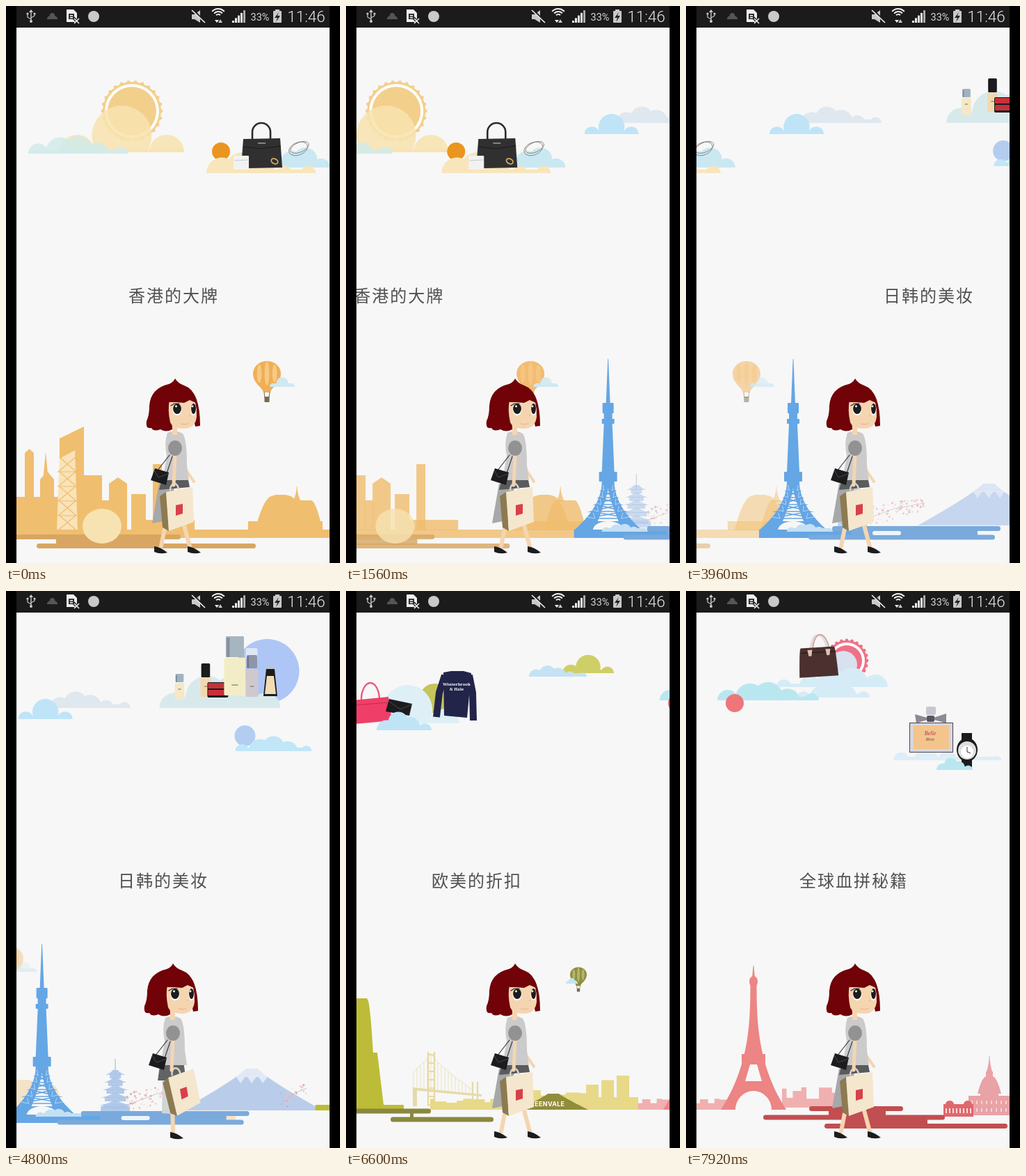
Animation, 480 px wide and 800 px high, one loop 8 s. Source, as an HTML page with a canvas:

```html
<!DOCTYPE html>
<html lang="zh">
<head>
<meta charset="utf-8">
<title>Shopping walk</title>
<style>
html, body { margin: 0; width: 100%; height: 100%; overflow: hidden; background: #000; }
canvas { display: block; width: 480px; height: 800px; }
</style>
</head>
<body>
<canvas id="stage" width="480" height="800"></canvas>
<script>
const ctx = document.getElementById('stage').getContext('2d');
const LOOP = 8000, STEP = 120, BG = '#f7f7f7', SKIN = '#f5d5b0', INK = '#1c1c1f';
const CJK = '"Noto Sans CJK SC", "Noto Sans CJK", sans-serif';
const titles = ['香港的大牌', '日韩的美妆', '欧美的折扣', '全球血拼秘籍'];

// scroll distance over time: [ms, px], joined by a monotone cubic
const keys = [[0, 0], [720, 88], [2520, 252], [3960, 432], [5640, 720], [6600, 1133], [7920, 1620]];
const slopes = keys.slice(1).map((k, i) => (k[1] - keys[i][1]) / (k[0] - keys[i][0]));
const tangents = keys.map((_, i) => {
  const a = slopes[i - 1] ?? slopes[i], b = slopes[i] ?? a;
  return 2 * a * b / (a + b);
});
function scrollAt(t) {
  const i = Math.max(0, keys.findIndex(k => k[0] >= t) - 1);
  const [t0, v0] = keys[i], [t1, v1] = keys[i + 1], d = t1 - t0;
  const u = (t - t0) / d, w = 1 - u;
  return v0 * (1 + 2 * u) * w * w + v1 * u * u * (3 - 2 * u)
    + d * u * w * (tangents[i] * w - tangents[i + 1] * u);
}
let scroll = 0;

// basic shapes
function trace(p) {
  ctx.beginPath();
  for (let i = 0; i < p.length; i += 2) ctx.lineTo(p[i], p[i + 1]);
}
function fill(color) { ctx.fillStyle = color; ctx.fill(); }
function stroke(color, width) { ctx.strokeStyle = color; ctx.lineWidth = width; ctx.stroke(); }
function poly(color, ...p) { trace(p); fill(color); }
function line(color, width, ...p) { trace(p); stroke(color, width); }
function box(color, x, y, w, h, r = 0) { ctx.beginPath(); ctx.roundRect(x, y, w, h, r); fill(color); }
function oval(color, x, y, rx, ry = rx) { ctx.beginPath(); ctx.ellipse(x, y, rx, ry, 0, 0, 7); fill(color); }
function ring(color, width, x, y, rx, ry = rx, turn = 0) {
  ctx.beginPath(); ctx.ellipse(x, y, rx, ry, turn, 0, 7); stroke(color, width);
}
function arch(color, width, x, y, rx, ry) {
  ctx.beginPath(); ctx.ellipse(x, y, rx, ry, 0, Math.PI, 0); stroke(color, width);
}
function path(color, d) { ctx.fillStyle = color; ctx.fill(new Path2D(d)); }
function curve(color, width, d) {
  ctx.strokeStyle = color; ctx.lineWidth = width; ctx.stroke(new Path2D(d));
}
function label(text, x, y, font, color, spacing = 0) {
  ctx.font = font; ctx.fillStyle = color; ctx.textAlign = 'center';
  ctx.letterSpacing = spacing + 'px';
  ctx.fillText(text, x + spacing / 2, y);
}
function random(seed) {
  return () => (seed = (seed * 16807) % 2147483647) / 2147483647;
}

// symmetric body whose half width runs from w0 to w1
function taper(color, cx, y0, y1, w0, w1, power = 1) {
  const left = [], right = [];
  for (let i = 0; i <= 24; i++) {
    const u = i / 24, y = y0 + (y1 - y0) * u, w = w0 + (w1 - w0) * u ** power;
    right.push(cx + w, y);
    left.unshift(cx - w, y);
  }
  poly(color, ...right, ...left);
}
function deck(color, cx, y, w, h) { box(color, cx - w, y, 2 * w, h, 1); }
// row of round bumps under an envelope, highest at the share `peak`
function cloud(color, x, w, base, height, peak = .4) {
  const n = Math.min(5, Math.max(3, Math.round(w / height * 1.3))), r = w / n * .72;
  ctx.save();
  ctx.beginPath(); ctx.rect(x, 0, w, base); ctx.clip();
  box(color, x, base - 5, w, 10, 5);
  for (let i = 0; i < n; i++) {
    const u = i / (n - 1), h = height * Math.max(.34, 1 - 1.25 * Math.abs(u - peak));
    const size = Math.min(r, h), cx = x + size + (w - 2 * size) * u;
    oval(color, cx, base - h + size, size);
  }
  ctx.restore();
}
function skyline(color, x, x2, base, low, high, seed) {
  const rnd = random(seed);
  while (x < x2) {
    const w = Math.min(x2 - x, 6 + rnd() * 14), h = low + rnd() * (high - low);
    box(color, x, base - h, w + .5, h);
    x += w;
  }
}
// block with a pointed roof
function house(color, x, w, top, roof, base = 753) {
  poly(color, x, base, x, top, x + w / 2, top - roof, x + w, top, x + w, base);
}
// stacked bars [x, x2], joined where neighbours overlap
function strips(color, y, gap, ...bars) {
  bars.forEach(([x, x2], i) => {
    box(color, x, y + i * gap, x2 - x, 7, 3.5);
    if (!i) return;
    const [px, px2] = bars[i - 1], from = Math.max(x, px) + 28;
    box(color, from, y + i * gap - 7, Math.max(0, Math.min(x2, px2) - 25 - from), 9);
  });
}
function gear(color, x, y, r, teeth) {
  for (let i = 0; i < teeth; i++) {
    const a = i * 2 * Math.PI / teeth;
    oval(color, x + Math.cos(a) * r, y + Math.sin(a) * r, 2.4);
  }
  ring(color, 4, x, y, r - 2);
  oval('#fff', x, y, r - 3);
  oval(color, x, y, r - 7);
}
function balloon(x, y, r, main, light) {
  ctx.save();
  ctx.translate(x, y); ctx.scale(r, r);
  path(main, 'M-1 0A1 .9 0 0 1 1 0C1 .7 .3 1 .25 1.35H-.25C-.3 1 -1 .7 -1 0Z');
  for (const i of [-1, 0, 1]) oval(light, i * .55, 0, .17, .85 - .2 * i * i);
  line('#7a6a52', .05, -.2, 1.3, -.16, 1.7, .16, 1.7, .2, 1.3);
  box('#7a6a52', -.18, 1.65, .36, .4, .06);
  ctx.restore();
}
function layer(ref, speed, draw, alpha = 1) {
  ctx.save();
  ctx.globalAlpha = alpha;
  ctx.translate((ref - scroll) * speed, 0);
  draw();
  ctx.restore();
}

// first city
function sunScene() {
  gear('#f3cf8c', 181, 151, 42, 26);
  ctx.globalAlpha = .85;
  cloud('#f8e3b0', 77, 179, 210, 67, .5);
  cloud('#d2ebe9', 32, 143, 212, 29, .4);
}
function bagScene() {
  cloud('#c9e8f2', 394, 72, 232, 38, .3);
  oval('#ea951f', 309, 209, 13);
  cloud('#f8e5bb', 288, 157, 240, 31, .22);
  arch('#2b2b2c', 2.6, 367, 181, 13, 13);
  line('#2b2b2c', 2.6, 354, 181, 354, 196); line('#2b2b2c', 2.6, 380, 181, 380, 196);
  poly('#303031', 341, 191, 394, 190, 397, 232, 349, 233, 338, 230);
  line('#19191a', 1, 341, 202, 366, 205, 395, 201);
  line('#bcbcbc', 1.2, 362, 197, 373, 197);
  box('#f2f2f0', 327, 215, 22, 20, 1);
  line('#c6c8cf', 1, 328, 222, 348, 221);
  for (const i of [0, 1]) ring('#8d827d', 1, 420 + 2 * i, 205 - 2 * i, 14, 9 - 2 * i, -.4);
  ring('#d8ad5a', 1.8, 386, 223, 5, 3.5, .5);
}
function goldCity() {
  const c = '#f0be6f';
  box(c, -40, 752, 740, 12);
  box(c, -40, 705, 117, 48);
  house(c, 27, 13, 642, 6); house(c, 49, 20, 680, 12); house(c, 54, 6, 672, 32);
  poly(c, 77, 753, 77, 621, 112, 604, 112, 753);
  box(c, 112, 674, 26, 79); house(c, 148, 26, 686, 9);
  box(c, 137, 710, 12, 43); box(c, 180, 701, 21, 52); box(c, 211, 658, 13, 95); box(c, 200, 738, 71, 15);
  poly('#f9e3b8', 77, 650, 99, 638, 103, 752, 73, 752);
  for (let y = 648; y < 745; y += 21) line(c, 1.2, 77, y, 101, y + 21, 75, y + 21, 100, y);
  taper(c, 395, 702, 753, 7, 37, .42);
  taper(c, 418, 690, 712, .4, 6, 2);
  taper(c, 425, 710, 753, 14, 30, .6);
  box(c, 348, 740, 107, 13);
  balloon(375, 528, 20, '#f0af55', '#f6c985');
  cloud('#cfe9f0', 379, 36, 547, 14, .5);
}

// second city
function blueTower() {
  const c = '#65a6e5', x = 154;
  taper(c, x, 507, 571, .4, 3);
  deck(c, x, 570, 8, 15); deck(c, x, 584, 6, 10); deck(c, x, 593, 9, 7);
  taper(c, x, 600, 670, 6, 9);
  deck(c, x, 669, 13, 14);
  taper(c, x, 683, 753, 9, 49, 2);
  taper(BG, x, 692, 740, 0, 15, 1.3);
  for (let y = 686; y < 736; y += 10) {
    const half = v => 8 + 40 * ((v - 683) / 69) ** 2, a = half(y), b = half(y + 10);
    line(c, 1.7, x - a, y, x + b, y + 10, x - b, y + 10, x + a, y);
    for (const s of [-1, 1]) line('#c7e0f5', .8, x + s * a * .9, y + 2, x + s * b * .6, y + 10, x + s * b * .95, y + 8);
  }
  oval(BG, x, 753, 22, 13);
  box(c, x - 49, 752, 150, 12);
  cloud('#c4e0f3', 145, 66, 755, 13);
  strips('#7aaadc', 747, 12.5, [210, 452], [176, 444]);
  box('#eef5fb', 268, 754, 41, 6, 3);
}
function blossoms(x, w, count, seed) {
  const rnd = random(seed);
  line('#c5abb0', .8, x, 738, x + w / 2, 722, x + w, 714);
  for (let i = 0; i < count; i++) {
    const u = rnd();
    oval(i % 3 ? '#eebfc4' : '#dba0a6', x + u * w, 735 - 20 * u + (rnd() - .5) * 32 * (1 - u / 2), .7 + rnd());
  }
}
function pagodaScene() {
  const c = '#a8c3e8', fuji = 243;
  taper('#b0c7ea', fuji, 686, 746, 8, 102, 1.15);
  taper('#e8edf7', fuji, 686, 698, 8, 24, 1.15);
  for (const i of [-1, 0, 1]) taper('#e8edf7', fuji + i * 16, 697, 707, 7, 0);
  line(c, 1.5, 47, 672, 47, 694);
  for (let i = 0; i < 5; i++) {
    const y = 688 + i * 11;
    taper(c, 47, y, y + 7, 4, 14 + i * 2.4, 1.6);
    deck(c, 47, y + 6, 8 + i * 2.4, 6);
  }
  deck(c, 47, 740, 21, 9);
  blossoms(64, 86, 90, 17);
  blossoms(284, 38, 25, 31);
}
function blueClouds() {
  cloud('#dfe8ee', 165, 116, 168, 25, .3);
  cloud('#bfe4f8', 120, 78, 184, 29, .5);
}
function bottle(x, w, top, cap, base, capColor, body) {
  box(capColor, x + w * .08, top, w * .84, cap, 1.5);
  box('#0003', x + w * .12, top + 2, w * .14, cap - 2);
  box(body, x, top + cap + 1, w, base - top - cap - 1, 2);
  line('#6c6757', 1, x + w * .35, base - 15, x + w * .65, base - 15);
}
function cosmetics() {
  oval('#aec6f6', 169, 115, 46);
  cloud('#d8e9ec', 14, 174, 168, 58, .5);
  bottle(36, 14, 119, 12, 156, '#9fb2c3', '#f4e8c8');
  bottle(73, 15, 104, 20, 152, INK, '#f2d9ad');
  box(INK, 83, 131, 30, 22, 2);
  for (const y of [132, 142]) box('#c73039', 84, y, 28, 8, 1);
  bottle(107, 31, 65, 30, 150, '#a7b5c1', '#f3edc7');
  box('#dfe6f4', 138, 82, 17, 16, 2);
  bottle(138, 18, 92, 19, 152, '#8e95aa', '#cfc8ce');
  box('#b9c6d0', 169, 107, 9, 6);
  taper(INK, 173.5, 112, 151, 6, 10);
  taper('#f1dcb3', 173.5, 122, 148, 5, 8);
}
function smallBlue() {
  oval('#b2cdf0', 192, 208, 15);
  cloud('#c0e6f8', 178, 110, 230, 23, .45);
}

// third city
function discounts() {
  cloud('#c6c55b', -17, 40, 188, 25, .5);
  oval('#c6c45a', 127, 154, 21);
  cloud('#def0f5', 14, 149, 190, 61, .42);
  arch('#e95b7c', 2.4, 35, 156, 13, 24);
  poly('#ef3f68', 10, 157, 61, 152, 66, 186, 12, 191);
  line('#c72a52', 1, 12, 164, 62, 160);
  poly(INK, 62, 155, 95, 162, 91, 179, 57, 173);
  line('#555', .8, 61, 158, 78, 170, 94, 163);
  cloud('#bfe4f6', 44, 79, 200, 29, .4);
  const navy = '#23244a';
  line(navy, 10, 142, 121, 134, 146, 130, 181);
  line(navy, 10, 177, 121, 182, 146, 183, 186);
  poly(navy, 140, 117, 151, 115, 169, 115, 180, 118, 174, 182, 141, 179);
  label('Winterbrook', 159, 136, 'bold 6px "Noto Serif", serif', '#fff');
  label('& Hale', 159, 143, 'bold 6px "Noto Serif", serif', '#fff');
  cloud('#cfcf68', 311, 74, 118, 28, .45);
  cloud('#c5e2f4', 263, 83, 123, 17, .3);
}
function oliveCity() {
  const c = '#e7d988', b = '#e5daa9', stone = '#bdbc38', mid = 23;
  // plain stepped monument
  taper(stone, mid - 1, 585, 664, 8, 17, .5);
  taper(stone, mid, 663, 738, 22, 31);
  deck(stone, mid, 738, 60, 8);
  // bridge: deck, pylons, hanging cables
  const road = x => 713 + (x - 96) * .1, cable = x => 664 + 54 * (Math.abs(x - 122) / 62) ** .8;
  poly(b, 96, road(96), 195, road(195), 195, road(195) + 3, 96, road(96) + 4);
  for (let x = 97; x < 182; x += 5) line(b, .7, x, road(x), x, cable(x), x + 5, cable(x + 5));
  for (const x of [118, 127, 182, 189]) line(b, 2.4, x, x < 150 ? 662 : 705, x, 740);
  for (let y = 666; y < 740; y += 12) line(b, 2, 118, y, 127, y);
  box(b, 96, 714, 6, 26);
  skyline(c, 121, 255, 745, 9, 19, 5);
  skyline(c, 255, 345, 745, 18, 34, 12);
  for (let i = 0; i < 3; i++) box(c, 345 + i * 22, 709 - i * 6.5, 18, 36 + i * 6.5);
  box(c, 345, 727, 75, 18);
  taper('#918d3b', 298, 722, 745, 8, 50, 1.1);
  label('GREENVALE', 286, 740, 'bold 9px Inter, sans-serif', '#fff', .3);
  balloon(334, 551, 12, '#8d9040', '#b5b469');
  cloud('#c5e5f2', 316, 17, 564, 8, .5);
}

// fourth city
function topGifts() {
  gear('#ee7187', 231, 100, 29, 24);
  oval('#d9e0ee', 226, 106, 20);
  cloud('#d5ecf6', 130, 160, 138, 32, .65);
  cloud('#d5ecf6', 160, 104, 153, 24, .5);
  ctx.save();
  ctx.translate(190, 103); ctx.rotate(-.06);
  for (const i of [0, 1]) arch(i ? '#c8aaa4' : '#e9dbd6', 3 - i, 2 + 3 * i, -14, 12, 26);
  taper('#4b302f', 0, -22, 20, 24, 28, .5);
  line('#30201f', 1.4, -25, -15, 26, -15);
  for (const s of [-1, 1]) taper('#dfc2b1', 2 + s * 13, -19, -10, 3.5, 2);
  ctx.restore();
  cloud('#b9e7f0', 45, 146, 157, 30, .4);
  oval('#ee767a', 70, 161, 13);
}
function lowGifts() {
  cloud('#dceef6', 298, 155, 243, 18, .3);
  box('#c7c8cf', 345, 166, 14, 12, 2);
  poly('#8b8b96', 329, 177, 374, 190, 374, 176, 331, 190);
  box('#55555d', 346, 179, 11, 9, 2);
  box('#4e4149', 321, 189, 63, 43);
  box('#d5d6df', 322, 190, 61, 41);
  box('#f3c58c', 327, 193, 51, 34);
  label('Belle', 351, 207, 'italic 8px "Liberation Serif", serif', '#a73848');
  label('Rive', 351, 215, 'italic 7px "Liberation Serif", serif', '#6b3a40');
  box(INK, 396, 204, 15, 49);
  oval(INK, 404, 228, 15, 17); oval('#dededf', 404, 229, 13); oval('#fff', 404, 231, 9);
  line('#333', 1, 404, 224, 404, 231, 409, 233);
  cloud('#b9e6ef', 360, 52, 257, 19, .4);
}
function pinkCity() {
  const c = '#ec8583', pale = '#f0b0b0', rose = '#e9a2a6', x = 97;
  box(pale, 14, 740, 90, 5, 2);
  skyline(pale, 14, 78, 742, 6, 17, 23);
  skyline(pale, 138, 222, 742, 10, 32, 44);
  taper(c, x, 538, 556, .4, 2);
  oval(c, x, 561, 6, 8);
  taper(c, x, 560, 745, 4.5, 47, 2.8);
  deck(c, x, 665, 17, 13);
  taper(BG, x, 680, 704, 5, 12);
  oval(BG, x, 745, 26, 27);
  taper(rose, 436, 668, 690, .5, 4, 2);
  deck(rose, 436, 690, 5, 10);
  taper(rose, 436, 697, 722, 4, 17, .5);
  deck(rose, 436, 716, 13, 14);
  box(rose, 406, 725, 60, 28);
  for (let i = 0; i < 16; i++) box('#f5d3d4', 410 + (i % 8) * 7, i < 8 ? 732 : 743, 2, 5);
  box('#df686d', 370, 737, 43, 18);
  for (const i of [0, 1]) oval('#df686d', 379 + i * 26, 737, 6, 5);
  for (let i = 0; i < 8; i++) box('#f8dede', 373 + i * 5, 743, 2, 7);
}

// walker
function shoe(x, y) {
  path(INK, `M${x - 9} ${y - 5}Q${x} ${y - 4} ${x + 10} ${y + 4}Q${x} ${y + 7} ${x - 9} ${y + 3}Z`);
}
function shopBag(x, y, swing) {
  ctx.save();
  ctx.translate(x, y); ctx.rotate(swing);
  arch('#ded6ca', 2.5, 12, -2, 6, 9);
  poly('#8d7a51', 0, 1, -9, 7, -5, 52, 4, 57);
  poly('#f4e7cd', 0, 1, 38, -6, 40, 44, 4, 57);
  poly('#d8404b', 14, 20, 24, 18, 24, 32, 14, 35);
  ctx.restore();
}
function head() {
  const hair = '#700208';
  box(SKIN, 239, 600, 7, 16);
  path(hair, 'M243 535Q247 542 256 545Q279 553 279 603L272 604L262 560L237 570L239 608Q230 613 222 608Q212 612 209 606Q200 608 202 596Q206 588 206 574Q208 549 234 543Q240 541 243 535Z');
  path(SKIN, 'M235 566H271Q274 575 274 590Q272 607 256 607Q240 607 236 598Q232 580 235 566Z');
  path(hair, 'M230 562Q250 548 272 560L273 570L264 566L256 570L245 569L235 569Z');
  for (const [x, w] of [[246, 6.5], [269.5, 4]]) {
    oval('#fff', x, 580, w, 8);
    oval(INK, x, 578.5, w - .6, 7.5);
    oval('#fff', x - 1.5, 575, 1.4);
  }
  line(INK, 1.2, 237, 574, 242, 571, 249, 571);
  oval('#e4b092', 264, 588, 1.2, .8);
  curve('#e3ae9a', 1, 'M251 600Q257 602 262 600');
}
function torso() {
  path('#cbcbcc', 'M232 613Q244 608 254 614Q260 622 260 660L263 681H225L231 646Q227 628 232 613Z');
  line(SKIN, 5, 243, 645, 241, 688);
  oval('#929293', 243, 635, 10, 11);
  line('#3a3a3c', 1.2, 235, 645, 217, 668); line('#3a3a3c', 1.2, 239, 647, 231, 671);
  poly(INK, 214, 664, 234, 670, 230, 688, 208, 681);
  line('#55565a', .8, 213, 667, 219, 677, 233, 672);
}
function walker(mid) {
  ctx.lineCap = 'round';
  if (mid) {
    line(SKIN, 6, 239, 735, 240, 778);
    shoe(245, 782);
    poly('#cfd6d5', 225, 690, 250, 690, 248, 752, 224, 750);
    poly('#626365', 222, 676, 255, 676, 259, 703, 218, 703);
    ctx.translate(-3, 0);
    torso(); shopBag(236, 698, -.16);
  } else {
    line(SKIN, 6, 231, 735, 223, 776); line(SKIN, 6, 253, 735, 264, 776);
    shoe(222, 781); shoe(270, 781);
    line(SKIN, 4, 257, 664, 270, 683);
    poly('#a6a8a9', 220, 686, 242, 690, 236, 738, 210, 743);
    poly('#5a5b5d', 225, 676, 261, 676, 264, 691, 220, 695);
    torso(); shopBag(230, 697, 0);
  }
  head();
}

function statusBar() {
  const g = '#c9c9c9', w = '#eee', bar = '#1b1b1b';
  box(bar, 15, 0, 450, 31);
  line(g, 1.4, 36, 7, 36, 22); taper(g, 36, 5, 9, 0, 3); oval(g, 36, 22, 2);
  for (const s of [-1, 1]) {
    line(g, 1.2, 36, 18 - s, 36 + s * 5, 15 - s, 36 + s * 5, 11);
    oval(g, 36 + s * 5, 11, 1.6);
  }
  cloud('#555', 59, 15, 19, 9, .5);
  poly(w, 87, 5, 97, 5, 102, 10, 102, 23, 87, 23);
  box('#333', 90, 11, 8, 8); box(w, 92, 13, 4, 1.5); box(w, 92, 16, 4, 1.5);
  line(bar, 4, 97, 17, 105, 25);
  line(w, 1.6, 98, 18, 105, 25); line(w, 1.6, 105, 18, 98, 25);
  oval(g, 126, 15, 8);
  poly(g, 267, 12, 271, 12, 279, 6, 279, 24, 271, 19, 267, 19);
  line(bar, 3, 268, 5, 287, 24); line(w, 1.7, 267, 6, 286, 24);
  for (let r = 4; r < 13; r += 4) {
    ctx.beginPath(); ctx.arc(305, 16, r, -2.4, -.75); stroke(w, 2);
  }
  taper(w, 303, 20, 24, 3, 0); taper(g, 308, 19, 24, 0, 3);
  for (let i = 0; i < 5; i++) box(i < 4 ? w : '#aaa', 325 + i * 4, 21 - i * 3.7, 3, 3 + i * 3.7);
  label('33%', 365, 21, '14.5px Roboto, sans-serif', '#d8d8d8');
  box(g, 387, 5, 6, 3); box(g, 384, 7, 12, 17, 1);
  poly('#222', 392, 9, 386, 17, 390, 17, 388, 23, 394, 14, 390, 14);
  label('11:46', 431.5, 23, '300 22.5px Roboto, sans-serif', '#e6e6e6');
}

function draw(t) {
  scroll = scrollAt(t);
  const fade = Math.max(.35, 1 - scroll / 860);
  const rise = Math.min(1, Math.max(.55, scroll / 640));
  ctx.lineCap = 'butt';
  box('#000', 0, 0, 480, 800);
  ctx.save();
  ctx.beginPath(); ctx.rect(15, 0, 450, 800); ctx.clip();
  box(BG, 15, 31, 450, 769);

  layer(0, .66, sunScene);
  layer(0, .915, bagScene);
  layer(432, .833, blueClouds);
  layer(720, 1.25, cosmetics);
  layer(720, .917, smallBlue);
  layer(1133, .833, discounts);
  layer(1620, .833, topGifts);
  layer(1620, .917, lowGifts);

  titles.forEach((s, i) =>
    layer(i * 540, 1, () => label(s, 240, 424.5, '300 24px ' + CJK, '#505050', 2)));

  layer(0, .667, goldCity, fade);
  layer(0, .75, () => strips('#d8a662', 759, 13, [-60, 251], [44, 359]), fade);
  layer(0, .41, () => oval('#f7e3b2', 138, 747, 28, 25), fade);
  layer(720, .667, pagodaScene, rise);
  layer(432, .833, blueTower);
  layer(1133, .833, oliveCity);
  layer(1133, .92, () => strips('#89883f', 743.5, 12, [-28, 122], [64, 212]));
  layer(1620, .833, pinkCity);
  layer(1620, .92, () => strips('#c14e51', 740, 12.5, [177, 312], [111, 372], [199, 462]));

  const stride = t % 1320;
  ctx.save();
  walker(stride >= 600 && stride < 1000);
  ctx.restore();
  ctx.lineCap = 'butt';
  statusBar();
  ctx.restore();
}

function tick(now) {
  draw(Math.floor((now % LOOP) / STEP) * STEP);
  requestAnimationFrame(tick);
}
draw(0);
requestAnimationFrame(tick);
</script>
</body>
</html>
```
